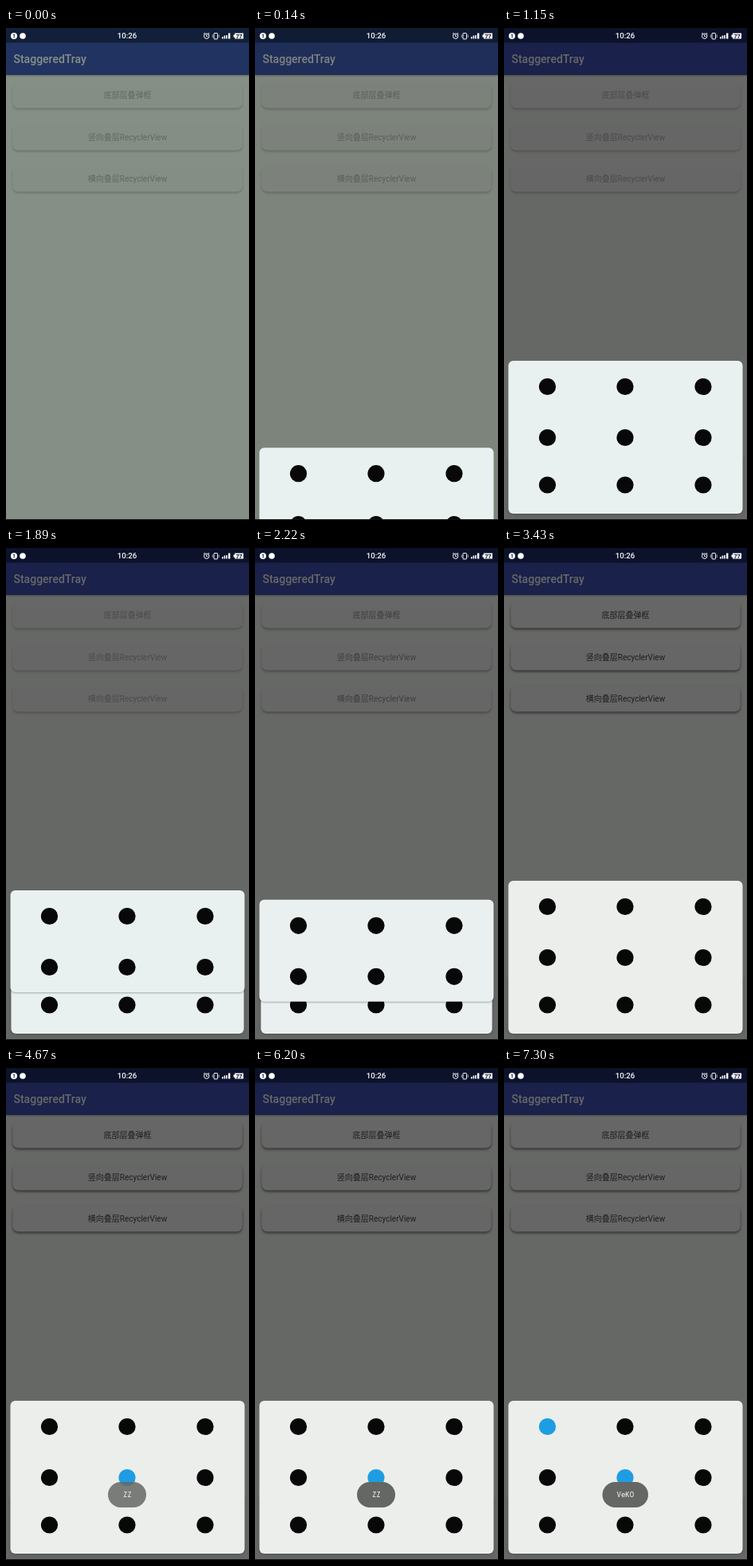
Animation of 305 by 618 pixels, one loop 8000 ms. Source, as an HTML page:

```html
<!DOCTYPE html>
<html lang="zh">
<head>
<meta charset="utf-8">
<style>
  html, body { margin: 0; width: 100%; height: 100%; overflow: hidden; background: #676965; }
  svg { display: block; width: 305px; height: 618px; }
  text { font-family: Roboto, "Noto Sans CJK SC", "Noto Sans CJK", sans-serif; }
  .button rect { fill: #fafafa; stroke: #fff; filter: drop-shadow(0 2px 1.5px rgba(0, 0, 0, .5)); }
  .button text { font-size: 10px; text-anchor: middle; fill: #484848; }
  #lower { filter: drop-shadow(0 1px 2px rgba(0, 0, 0, .2)); }
  .toast rect { fill: #646764; }
  .toast text { font: 9px "Noto Sans Mono", monospace; text-anchor: middle; fill: #fff; }
</style>
</head>
<body>
<svg viewBox="0 0 305 618">
  <rect width="305" height="618" fill="#fcfffa"/>
  <rect y="18" width="305" height="41" fill="#3f51b5" style="filter:drop-shadow(0 1px 1px rgba(0,0,0,.3))"/>
  <rect width="305" height="18.5" fill="#202c6a"/>
  <text x="9.5" y="44" font-size="14" font-weight="500" fill="#fff">StaggeredTray</text>
  <g id="buttons"></g>
  <rect id="dim" width="305" height="618"/>

  <g fill="#fff" stroke-width="1">
    <circle cx="10" cy="10" r="4"/>
    <path d="M9.2 8.5l1-.7v4.6" fill="none" stroke="#0d1128"/>
    <circle cx="21" cy="10" r="3.8"/>
    <text x="152" y="13.4" font-size="9.6" font-weight="500" text-anchor="middle">10:26</text>
    <g fill="none" stroke="#fff">
      <circle cx="251.7" cy="10.2" r="3.2"/>
      <path d="M251.7 8.2v2.2h1.5M248 7.5l1.6-1.4M255.4 7.5l-1.6-1.4"/>
      <rect x="261" y="6.5" width="4.6" height="7.4" rx=".8"/>
      <path d="M259.3 8.5v3.4M267.3 8.5v3.4" stroke-width=".6"/>
    </g>
    <path d="M271 11h1.6v2.5H271zM273.6 9.5h1.6v4h-1.6zM276.2 9h1.6v4.5h-1.6zM279 6.5h2.4v7H279z"/>
    <path d="M287 6.5h11v7h-11v-2h-1.5v-3h1.5z"/>
    <text x="292.6" y="12.7" font-size="7" font-weight="700" text-anchor="middle" fill="#0d1128">77</text>
  </g>

  <g id="sheet">
    <g id="lower"><rect id="base" rx="6"/></g>
    <g id="upper"><rect x="5.5" y="418" width="294" height="128" rx="6"/></g>
  </g>

  <g class="toast" id="toastA"><rect x="128" y="520" width="48" height="32" rx="16"/><text x="152.3" y="539">ZZ</text></g>
  <g class="toast" id="toastB"><rect x="123.5" y="520" width="57.5" height="32" rx="16"/><text x="152.3" y="539">VeKO</text></g>
  <rect y="617" width="305" height="1" fill="#111"/>
</svg>
<script>
const LOOP = 8000, FOLD = 57;
const $ = id => document.getElementById(id);

function add(parent, tag, attrs, text = '') {
  const node = document.createElementNS('http://www.w3.org/2000/svg', tag);
  for (const key in attrs) node.setAttribute(key, attrs[key]);
  node.textContent = text;
  return parent.appendChild(node);
}

[['底部层叠弹框', 68], ['竖向叠层RecyclerView', 121], ['横向叠层RecyclerView', 173]].forEach(([label, y]) => {
  const button = add($('buttons'), 'g', { class: 'button' });
  add(button, 'rect', { x: 9, y, width: 287, height: 32, rx: 6 });
  add(button, 'text', { x: 152.5, y: y + 20 }, label);
});

const icons = [450.5, 514.5, 574].map((cy, row) =>
  [54.5, 152, 250].map(cx => add($(row < 2 ? 'upper' : 'lower'), 'circle', { cx, cy, r: 10.6 })));

const ramp = (t, from, to) => Math.min(1, Math.max(0, (t - from) / (to - from)));
const mix = (a, b, p) => a + (b - a) * p;
const mixColor = (a, b, p) => `rgb(${a.map((v, i) => Math.round(mix(v, b[i], p)))})`;
const easeIn = p => p * p;
const easeOut = p => 1 - (1 - p) ** 2;
const smooth = p => p * p * (3 - 2 * p);

function draw(t) {
  const dimming = ramp(t, 75, 300);
  $('dim').setAttribute('fill-opacity', mix(.47, .592, dimming));
  $('dim').setAttribute('fill', mixColor([0, 17, 0], [0, 0, 0], dimming));

  // The page starts pale and cool, and gains contrast during the drag.
  const clarity = ramp(t, 2010, 2760);
  $('buttons').setAttribute('opacity', mix(.4, 1, clarity));
  $('sheet').setAttribute('fill', mixColor([232, 241, 240], [235, 238, 235], clarity));

  const rise = easeOut(ramp(t, 60, 370));
  $('sheet').setAttribute('transform', `translate(0 ${200 * (1 - rise)})`);

  // The upper card slides over the lower one, which narrows beneath it.
  const fold = 14 * easeIn(ramp(t, 1150, 1950))
    + (FOLD - 14) * smooth(ramp(t, 1980, 2760))
    - FOLD * smooth(ramp(t, 3040, 3430));
  const inset = 4.5 * fold / FOLD;
  $('upper').setAttribute('transform', `translate(0 ${fold})`);
  $('upper').style.filter = fold > .5 ? 'drop-shadow(0 1px 1px rgba(0,0,0,.3))' : 'none';
  const top = 536 + fold;
  for (const [key, value] of Object.entries({ x: 5.5 + inset, y: top, width: 294 - 2 * inset, height: 610 - top }))
    $('base').setAttribute(key, value);

  const tint = (icon, active) => icon.setAttribute('fill', active ? '#1e9de3' : '#080808');
  icons.flat().forEach(icon => tint(icon, false));
  tint(icons[1][1], t >= 4190);
  tint(icons[0][0], t >= 6800);

  $('toastA').setAttribute('opacity', ramp(t, 4190, 4760) * (1 - ramp(t, 6200, 6650)));
  $('toastB').setAttribute('opacity', ramp(t, 6800, 7300));
}

function tick() {
  draw(performance.now() % LOOP);
  requestAnimationFrame(tick);
}
tick();
</script>
</body>
</html>
```
